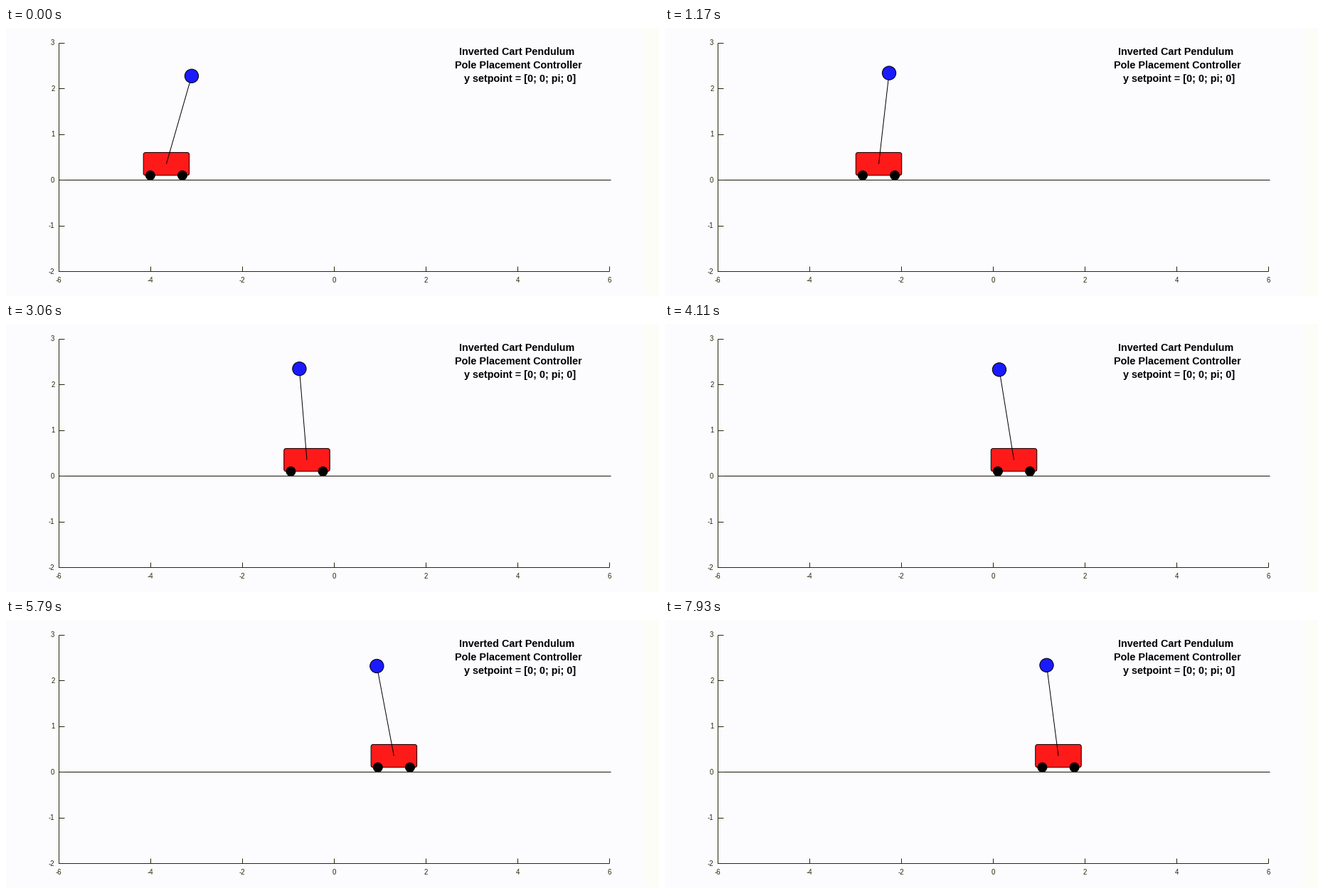
A matplotlib script for the animation above (8 s loop, 918 px wide and 378 px high).

```python
import numpy as np
import matplotlib.pyplot as plt
from matplotlib.animation import FuncAnimation
from matplotlib.patches import Circle, FancyBboxPatch, Rectangle

W, H, DPI = 918, 378, 72
LOOP, STEP, REDRAW = 8000, 20, 30   # ms
UNIT, X0, Y0 = 64.5, 461.3, 214.3   # pixels per unit, pixel of the origin
INK = "#26260a"

# Cart and pendulum sizes in axis units
BODY_W, BODY_H, WHEEL, BOB, POLE = 1, 0.5, 0.1, 0.15, 2
PIVOT = WHEEL + BODY_H / 2

# Key poses: time, cart position, pole angle from upright
POSES = [(0, -3.657, 0.279), (1170, -2.493, 0.113), (3060, -0.594, -0.082),
         (4110, 0.453, -0.160), (5790, 1.360, -0.187), (7930, 1.422, -0.128)]

# Playback stalls on one pose for HOLD ms, or the canvas is cleared
STALLS, HOLD = [1590, 2140, 2390, 3310, 3610, 4110, 5290, 5620, 6420, 6710], 200
BLANKS = [(250, 550), (840, 1170), (4360, 4620), (6920, 7170)]

times, *tracks = np.array(POSES).T
tracks = np.array(tracks)
slopes = np.gradient(tracks, times, axis=1)


def pose(t):
    """Cart position and pole angle on a cubic Hermite curve."""
    i = int(np.clip(np.searchsorted(times, t, "right") - 1, 0, len(times) - 2))
    h = times[i + 1] - times[i]
    u = (t - times[i]) / h
    return ((1 + 2 * u) * (1 - u) ** 2 * tracks[:, i]
            + u * (1 - u) ** 2 * h * slopes[:, i]
            + u * u * (3 - 2 * u) * tracks[:, i + 1]
            + u * u * (u - 1) * h * slopes[:, i + 1])


plt.rcParams["font.family"] = "Liberation Sans"
fig = plt.figure(figsize=(W / DPI, H / DPI), dpi=DPI, facecolor="#fcfcfe")
ax = fig.add_axes([0, 0, 1, 1])
ax.set_xlim(-X0 / UNIT, (W - X0) / UNIT)
ax.set_ylim((Y0 - H) / UNIT, Y0 / UNIT)
ax.axis("off")
fig.add_artist(Rectangle((897 / W, 0), 1, 1, color="#fdfdf8", lw=0))

scene = []


def show(artist):
    scene.append(artist)
    return artist


def line(xs, ys, color=INK, **kw):
    return show(ax.plot(xs, ys, color=color, lw=1,
                        solid_capstyle="butt", **kw)[0])


def label(x, y, text, size=9.6, color=INK, **kw):
    show(ax.text(x, y, text, size=size, color=color, va="baseline", **kw))


def disc(radius, color, z):
    return show(ax.add_patch(Circle((0, WHEEL), radius, fc=color, ec="black",
                                    lw=1, zorder=z)))


# Axes
line([-6, -6], [-2, 3])
line([-6, 6], [-2, -2])
line([-6, 6.02], [0, 0], "#161604")
for v in range(-6, 7, 2):
    line([v, v], [-2, -1.88])
    label(v, -2.243, str(v), ha="center")
for v in range(-2, 4):
    line([-6, -5.88], [v, v])
    label(-6.09, v - 0.054, str(v), ha="right")

# Title
for i, text in enumerate(["Inverted Cart Pendulum",
                          "Pole Placement Controller",
                          "y setpoint = [0; 0; pi; 0]"]):
    label(3.985 + 0.03 * i, 2.733 - 0.2946 * i, text, 14.4, "black",
          weight="bold", ha="center")

# Cart and pendulum
body = show(ax.add_patch(FancyBboxPatch(
    (0, WHEEL), BODY_W, BODY_H, boxstyle="round,pad=0,rounding_size=0.05",
    fc="#ff1a1a", ec="black", lw=1, zorder=3)))
wheels = [disc(WHEEL, "black", 4) for _ in range(2)]
rod = line([], [], "black", zorder=5)
bob = disc(BOB, "#1a1aff", 6)


def draw(n):
    t = n * STEP + STEP / 2
    visible = not any(a <= t < b for a, b in BLANKS)
    for artist in scene:
        artist.set_visible(visible)
    shown = next((s for s in STALLS if s <= t < s + HOLD),
                 t // REDRAW * REDRAW)
    x, angle = pose(shown)
    tip = x + POLE * np.sin(angle), PIVOT + POLE * np.cos(angle)
    body.set_x(x - BODY_W / 2)
    for wheel, side in zip(wheels, (-1, 1)):
        wheel.center = x + side * 0.35 * BODY_W, WHEEL
    rod.set_data([x, tip[0]], [PIVOT, tip[1]])
    bob.center = tip
    return scene


anim = FuncAnimation(fig, draw, frames=LOOP // STEP, interval=STEP,
                     repeat=True, repeat_delay=0, cache_frame_data=False)
plt.show()
```
